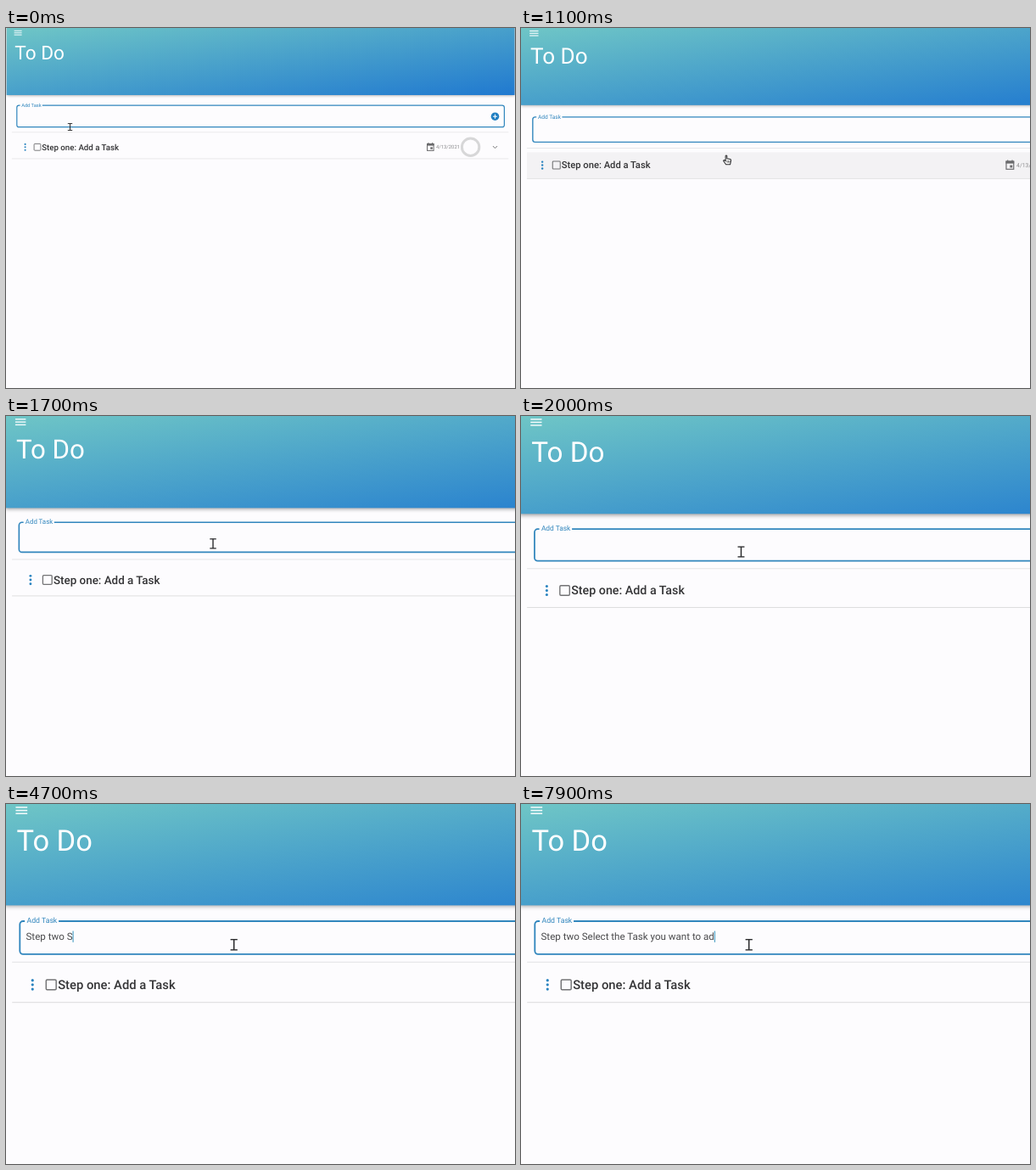
An HTML page with a canvas that plays this animation: 600 px wide and 424 px high, repeating every 8 s.

```html
<!DOCTYPE html>
<html lang="en">
<head>
<meta charset="utf-8">
<title>To Do</title>
<style>
  html, body { margin: 0; width: 100%; height: 100%; overflow: hidden; background: #fdfcfe; }
  canvas { display: block; width: 600px; height: 424px; }
</style>
</head>
<body>
<canvas id="stage"></canvas>
<script>
const W = 600, H = 424, LOOP = 8000, TICK = 100;
const BLUE = '#3186bd', PAGE = '#fdfcfe';
const canvas = document.getElementById('stage');
const ctx = canvas.getContext('2d');
const dpr = window.devicePixelRatio || 1;
canvas.width = W * dpr;
canvas.height = H * dpr;

const TASK = 'Step two Select the Task you want to ad';
// Typing bursts: first key, last key, number of keys
const BURSTS = [
  [2600, 3400, 9], [4700, 4800, 2], [5000, 5300, 5], [5500, 5800, 4],
  [6300, 6300, 1], [6500, 7300, 11], [7400, 7900, 7]
];

const clamp = v => Math.min(1, Math.max(0, v));
const ease = (t, from, to) => (1 - Math.cos(Math.PI * clamp((t - from) / (to - from)))) / 2;
const mix = (a, b, p) => a + (b - a) * p;

function text(str, x, y, size, color, weight = 400) {
  ctx.font = `${weight} ${size}px Roboto, sans-serif`;
  ctx.fillStyle = color;
  ctx.fillText(str, x, y);
}

function rect(x, y, w, h, color) {
  ctx.fillStyle = color;
  ctx.fillRect(x, y, w, h);
}

function dot(x, y, r, color) {
  ctx.fillStyle = color;
  ctx.beginPath();
  ctx.arc(x, y, r, 0, Math.PI * 2);
  ctx.fill();
}

function line(points, color, width) {
  ctx.strokeStyle = color;
  ctx.lineWidth = width;
  ctx.beginPath();
  points.forEach(([x, y], i) => i ? ctx.lineTo(x, y) : ctx.moveTo(x, y));
  ctx.stroke();
}

function typing(t) {
  let count = 0, last = null;
  for (const [from, to, keys] of BURSTS) {
    if (t < from) break;
    const p = to > from ? clamp((t - from) / (to - from)) : 1;
    count += 1 + Math.floor(p * (keys - 1) + 1e-6);
    last = Math.min(t, to);
  }
  const caret = last !== null && (t - last + 100) % 800 < 400;
  return { value: TASK.slice(0, count), caret };
}

function pointer(t) {
  const a = ease(t, 0, 1000), b = ease(t, 1100, 1500);
  return {
    x: mix(mix(75.5, 211.4, a), 178.3, b),
    y: mix(mix(116.5, 135, a), 109.4, b)
  };
}

function header(scale) {
  const w = W, h = 79, k = 2 * w * h / (w * w + h * h);
  const fill = ctx.createLinearGradient(0, 0, h * k, w * k);
  fill.addColorStop(0, '#6fc6c6');
  fill.addColorStop(1, '#2079d0');
  ctx.save();
  ctx.shadowColor = 'rgba(0,0,0,.42)';
  ctx.shadowBlur = 3.5 * scale * dpr;
  ctx.shadowOffsetY = 1.2 * scale * dpr;
  rect(0.7, -6, w - 1.2, h + 6, fill);
  ctx.restore();
  for (const y of [3.3, 5.7, 8.1]) rect(9.6, y - 0.5, 9, 1, '#f4fbfc');
  text('To Do', 10.3, 37.1, 22.6, '#fff');
}

function inputBox({ value, caret }) {
  ctx.strokeStyle = BLUE;
  ctx.lineWidth = 1.2;
  ctx.beginPath();
  ctx.roundRect(12.8, 91.2, 574.6, 25.5, 2.5);
  ctx.stroke();
  rect(16.6, 90, 26.2, 2.4, PAGE);
  text('Add Task', 18.2, 92.7, 5.7, BLUE);
  dot(576.5, 104.2, 4.8, '#2380c3');
  line([[574, 104.2], [579, 104.2]], '#fff', 1);
  line([[576.5, 101.7], [576.5, 106.7]], '#fff', 1);
  text(value, 17.5, 105.7, 7.6, '#4a4a4c');
  if (caret) rect(17.5 + ctx.measureText(value).width, 98.8, 0.75, 8.7, '#4b9fc4');
}

function calendar(x, y) {
  const c = '#6a6a6c';
  ctx.strokeStyle = c;
  ctx.lineWidth = 1;
  ctx.strokeRect(x - 3.8, y - 3.6, 7.6, 8);
  rect(x - 4.2, y - 4, 8.4, 2.6, c);
  rect(x - 2.8, y - 5, 1, 1.5, c);
  rect(x + 1.8, y - 5, 1, 1.5, c);
  rect(x, y + 0.3, 2.5, 2.5, c);
}

function taskRow(hover) {
  if (hover) rect(6.8, 127.2, 585.5, 26.8, '#f3f2f4');
  rect(6.8, 122.5, 585.5, 0.7, '#e3e3e5');
  rect(6.8, 153.6, 585.5, 0.7, '#dededf');
  for (const y of [136.9, 140.3, 143.7]) dot(22.6, y, 1.05, '#2b84c0');
  ctx.strokeStyle = '#737375';
  ctx.lineWidth = 0.95;
  ctx.beginPath();
  ctx.roundRect(33.1, 136.4, 7.8, 7.8, 0.8);
  ctx.stroke();
  text('Step one: Add a Task', 42.2, 143.6, 9.7, '#343436', 500);
  calendar(500.3, 140);
  text('4/13/2021', 507, 142, 5.9, '#8c8c8e');
  ctx.strokeStyle = '#d7d7d8';
  ctx.lineWidth = 3;
  ctx.beginPath();
  ctx.arc(547.6, 140.2, 10.2, 0, Math.PI * 2);
  ctx.stroke();
  line([[574, 139.1], [576.5, 141.6], [579, 139.1]], '#757577', 1);
}

function beam() {
  const c = '#29292b';
  line([[0, -4], [0, 4]], c, 1);
  line([[-2.7, -4], [2.7, -4]], c, 0.9);
  line([[-2.7, 4], [2.7, 4]], c, 0.9);
}

function hand() {
  ctx.beginPath();
  ctx.moveTo(-1.6, 0.6);
  ctx.lineTo(-1.6, -4.2);
  ctx.quadraticCurveTo(-0.9, -5.4, -0.2, -4.2);
  ctx.lineTo(-0.2, -1.5);
  ctx.lineTo(3.2, -0.8);
  ctx.quadraticCurveTo(4, -0.5, 3.9, 0.6);
  ctx.lineTo(3.1, 4.6);
  ctx.lineTo(-1.2, 4.6);
  ctx.lineTo(-3.8, 0.9);
  ctx.quadraticCurveTo(-3.2, -0.6, -1.6, 0.9);
  ctx.closePath();
  ctx.fillStyle = '#fff';
  ctx.fill();
  ctx.strokeStyle = '#29292b';
  ctx.lineWidth = 0.9;
  ctx.stroke();
  for (const x of [0.1, 1.4, 2.7]) line([[x, 0.6], [x, 2.8]], '#29292b', 0.6);
}

function draw(t) {
  const zoom = ease(t, 335, 2435);
  const scale = 1 + 0.525 * zoom;
  const mouse = pointer(t);
  const hover = mouse.y > 127;

  ctx.setTransform(dpr, 0, 0, dpr, 0, 0);
  rect(0, 0, W, H, PAGE);
  ctx.translate(-3.2 * zoom, -1.1 * zoom);
  ctx.scale(scale, scale);
  ctx.textRendering = 'geometricPrecision';
  header(scale);
  inputBox(typing(t));
  taskRow(hover);
  ctx.translate(mouse.x, mouse.y);
  hover ? hand() : beam();
}

const start = performance.now();
function frame() {
  const t = (performance.now() - start) % LOOP;
  draw(Math.floor(t / TICK) * TICK);
  requestAnimationFrame(frame);
}
frame();
</script>
</body>
</html>
```
